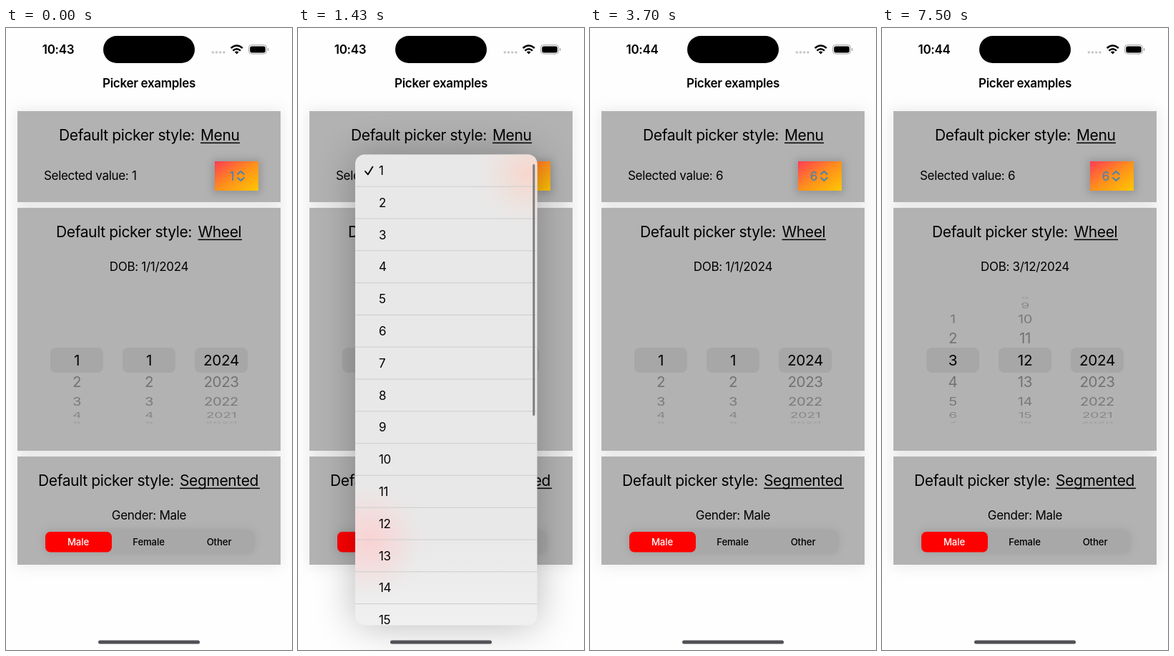
Recreate the animation shown at these times as an HTML page. Size 400 by 868 pixels, loop 8 s.

```html
<!DOCTYPE html>
<html lang="en">
<head>
<meta charset="utf-8">
<title>Picker examples</title>
<style>
  html, body { margin: 0; width: 100%; height: 100%; overflow: hidden; background: #fefefe; }
  svg { display: block; width: 100vw; height: 100vh; }
  text { font: 400 17px Inter, sans-serif; letter-spacing: -.018em; white-space: pre; }
  .mid { text-anchor: middle; }
  .bold { font-weight: 600; }
  .head { font-size: 21px; }
  .seg { font-size: 13.2px; font-weight: 500; letter-spacing: -.01em; }
  .num { font-size: 20.7px; }
  .halo { filter: blur(10px); }
  .soft { filter: blur(6px); }
  .shade { filter: blur(28px); }
</style>
</head>
<body>
<svg id="stage" viewBox="0 0 400 868">
  <defs>
    <linearGradient id="warm" x1="0" y1="0" x2="1" y2="1">
      <stop offset="0" stop-color="#ff3b55"/>
      <stop offset=".5" stop-color="#ff8f1c"/>
      <stop offset="1" stop-color="#ffc800"/>
    </linearGradient>
    <linearGradient id="frost" x1="0" y1="0" x2="0" y2="1">
      <stop offset=".8" stop-color="#e8e8e8"/>
      <stop offset="1" stop-color="#f0f0f0"/>
    </linearGradient>
    <radialGradient id="glowTop" gradientUnits="userSpaceOnUse" cx="322" cy="204" r="82">
      <stop offset="0" stop-color="#f8d6cc"/>
      <stop offset=".4" stop-color="#f2dcd4" stop-opacity=".7"/>
      <stop offset="1" stop-color="#eae8e8" stop-opacity="0"/>
    </radialGradient>
    <radialGradient id="glowLow" gradientUnits="userSpaceOnUse" cx="100" cy="715" r="88">
      <stop offset="0" stop-color="#fad2d2"/>
      <stop offset=".45" stop-color="#f5dada" stop-opacity=".75"/>
      <stop offset="1" stop-color="#eae8e8" stop-opacity="0"/>
    </radialGradient>
    <clipPath id="menuClip"><rect class="box"/></clipPath>
  </defs>

  <rect width="400" height="868" fill="#fefefe"/>
  <rect class="halo" x="14" y="114" width="372" height="637" fill="#ebebeb"/>
  <g fill="#b2b2b2">
    <rect x="16" y="116" width="368" height="127"/>
    <rect x="16" y="251" width="368" height="339"/>
    <rect x="16" y="598" width="368" height="151"/>
  </g>

  <text class="bold mid" id="clock" x="73" y="36"></text>
  <rect x="136" y="11" width="128" height="38" rx="19"/>
  <g fill="#c8c8c4">
    <circle cx="289.3" cy="34" r="1.8"/><circle cx="294.5" cy="34" r="1.8"/>
    <circle cx="299.7" cy="34" r="1.8"/><circle cx="304.9" cy="34" r="1.8"/>
  </g>
  <g fill="none" stroke="#000" stroke-width="2.5">
    <path d="M314.6 28.2Q322.7 20.8 330.8 28.2"/>
    <path d="M317.4 31.6Q322.7 26.8 328 31.6"/>
  </g>
  <path d="M319.8 33.6Q322.7 31.3 325.6 33.6L322.7 36.6Z"/>
  <rect x="339.5" y="23.7" width="25" height="12.4" rx="4" fill="none" stroke="#a2a2a0"/>
  <rect x="341.2" y="25.4" width="21.6" height="9" rx="2.6"/>
  <path d="M366 28v4q1.6-.5 1.6-2t-1.6-2" fill="#a2a2a0"/>
  <text class="bold mid" x="200" y="83">Picker examples</text>

  <g id="heads"></g>

  <text id="picked" x="53" y="212"></text>
  <g id="button">
    <rect class="soft" x="289" y="184" width="67" height="47" fill="#555" opacity=".32"/>
    <rect x="292" y="186" width="61" height="41" fill="url(#warm)"/>
    <path d="M324 204l4.4-4 4.4 4M324 209l4.4 4 4.4-4" fill="none" stroke="#3b83bd" stroke-width="1.7" stroke-linecap="round" stroke-linejoin="round"/>
    <text id="value" x="319" y="213" text-anchor="end" fill="#3b83bd"></text>
  </g>

  <text class="mid" id="dob" x="200" y="339"></text>
  <g id="wheels"></g>

  <text class="mid" x="200" y="686">Gender: Male</text>
  <rect class="soft" x="53" y="701" width="294" height="32" rx="8" fill="#555" opacity=".2"/>
  <rect x="53" y="701" width="294" height="32" rx="8" fill="#a8a8a8"/>
  <rect x="55" y="703" width="93" height="28.5" rx="7" fill="#f00"/>
  <text class="seg mid" x="101" y="721.5" fill="#fff">Male</text>
  <text class="seg mid" x="199.5" y="721.5">Female</text>
  <text class="seg mid" x="298" y="721.5">Other</text>

  <g id="menu">
    <g id="back">
      <rect class="box shade" opacity=".28"/>
      <rect class="box" fill="url(#frost)"/>
      <rect class="box" fill="url(#glowTop)"/>
      <rect class="box" fill="url(#glowLow)"/>
    </g>
    <g clip-path="url(#menuClip)"><g id="rows"></g></g>
  </g>

  <rect x="129" y="854.5" width="142" height="5" rx="2.5" fill="#505056"/>
</svg>
<script>
const $ = id => document.getElementById(id);
const clamp = v => Math.max(0, Math.min(1, v));

function add(parent, tag, attrs, label) {
  const el = document.createElementNS('http://www.w3.org/2000/svg', tag);
  for (const k in attrs) el.setAttribute(k, attrs[k]);
  if (label !== undefined) el.textContent = label;
  parent.appendChild(el);
  return el;
}
function setText(el, s) { if (el.textContent !== s) el.textContent = s; }
function show(el, on) { el.setAttribute('display', on ? 'inline' : 'none'); }

// Section headings: start, link start, link end, baseline, link
[[74, 272, 327, 157, 'Menu'], [70, 268.5, 330, 292, 'Wheel'], [45, 243, 355, 639, 'Segmented']]
  .forEach(([x, from, to, y, link]) => {
    add($('heads'), 'text', { class: 'head', x, y }, 'Default picker style:');
    add($('heads'), 'text', { class: 'head', x: from, y }, link);
    add($('heads'), 'rect', { x: from, y: y + 2.6, width: to - from, height: 1.5 });
  });

// Wheels
const MID = 463.8, RADIUS = 88, STEP = 20.2 * Math.PI / 180;
function makeWheel(x, count, label) {
  const g = $('wheels');
  add(g, 'rect', { x: x - 37, y: 446, width: 74, height: 35, rx: 8, fill: '#a7a7a7' });
  const cells = Array.from({ length: 10 }, () => add(g, 'text', { class: 'num mid', y: 7.5 }));
  return pos => cells.forEach((el, j) => {
    const i = Math.floor(pos) - 4 + j, d = i - pos;
    const on = i >= 0 && i < count && Math.abs(d) < 4.35;
    show(el, on);
    if (!on) return;
    const a = d * STEP, c = Math.cos(a), near = Math.abs(d) < .5;
    setText(el, String(label(i)));
    el.setAttribute('transform',
      `translate(${x} ${MID + RADIUS * Math.sin(a)}) scale(${.88 + .12 * c} ${c})`);
    el.setAttribute('fill', near ? '#000' : '#555');
    el.setAttribute('opacity', near ? 1 : .72 * Math.pow(c, .6));
  });
}
const month = makeWheel(99, 12, i => i + 1);
const day = makeWheel(200, 31, i => i + 1);
const year = makeWheel(301, 100, i => 2024 - i);

// Menu rows in full-size coordinates
const LEFT = 80, TOP = 176.4, WIDTH = 254.5, HEIGHT = 657, PITCH = 44.8;
const rows = $('rows');
const lit = add(rows, 'rect', {
  x: LEFT, y: TOP + 5 * PITCH, width: WIDTH, height: PITCH, fill: '#777', opacity: .25
});
for (let i = 0; i < 15; i++) {
  const y = TOP + i * PITCH;
  add(rows, 'text', { x: 113, y: y + 28.6 }, String(i + 1));
  if (i) add(rows, 'rect', { x: LEFT, y: y - .5, width: WIDTH, height: 1, fill: '#cdcdcf' });
}
add(rows, 'path', {
  d: 'M94 200l3.8 4.4 6.6-10.6', fill: 'none', stroke: '#000',
  'stroke-width': 1.9, 'stroke-linecap': 'round', 'stroke-linejoin': 'round'
});
const thumb = add(rows, 'rect', { x: 328.3, y: 190, width: 3, rx: 1.5, fill: '#7c7c7c' });
const boxes = [...document.querySelectorAll('.box')];

const spring = x => 1 - (1 + x) * Math.exp(-x);
const AX = 272.6, AY = 240;

function drawMenu(t) {
  const on = t >= 499 && t < 2160, closing = t >= 1899;
  show($('menu'), on);
  if (!on) return;
  const s = closing ? 1 - spring((t - 1867) * .0133) : spring((t - 450) * .0366);
  const gone = 1 - s;
  const px = x => AX + (x - AX) * s, py = y => AY + (y - AY) * s;
  const box = {
    x: px(LEFT), y: py(TOP), width: WIDTH * s,
    height: Math.max(20, HEIGHT - 700 * gone) * s, rx: 13 * s
  };
  boxes.forEach(el => { for (const k in box) el.setAttribute(k, box[k]); });
  rows.setAttribute('transform', `translate(${AX * gone} ${AY * gone}) scale(${s})`);
  $('back').setAttribute('opacity', clamp(1 - (closing ? 2.4 : .9) * gone));
  rows.setAttribute('opacity', clamp(1 - (closing ? 1.6 : 1.2) * gone));
  show(lit, closing);
  thumb.setAttribute('height', closing ? 36 : 351);
  thumb.setAttribute('opacity', clamp((t - 1300) / 133));
}

// A flick: short run-up, long glide
const glide = (t, from, to) => 1 - Math.pow(1 - Math.pow(clamp((t - from) / (to - from)), 1.5), 2.5);

function draw(t) {
  const value = t < 1899 ? 1 : 6;
  setText($('clock'), t < 3699 ? '10:43' : '10:44');
  setText($('picked'), 'Selected value: ' + value);
  setText($('value'), String(value));
  $('button').setAttribute('transform', `translate(${value === 1 ? 0 : -1} 0)`);
  setText($('dob'), `DOB: ${t < 5230 ? 1 : 3}/${t < 7430 ? 1 : 12}/2024`);
  month(2 * glide(t, 4690, 5230));
  day(11 * glide(t, 6500, 7366));
  year(0);
  drawMenu(t);
}

const TICK = 1000 / 15, SLACK = 5;
function frame() {
  const t = performance.now() % 8000;
  draw(Math.max(0, TICK / 2 + TICK * Math.floor((t + SLACK - TICK / 2) / TICK)));
  requestAnimationFrame(frame);
}
frame();
</script>
</body>
</html>
```
